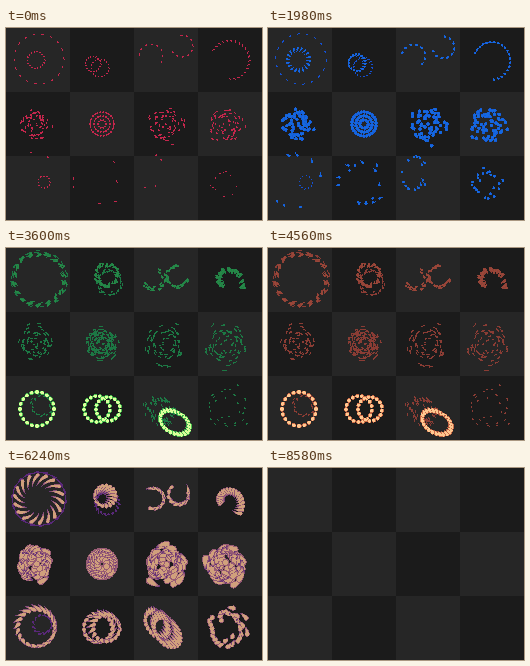
Write an HTML page with a canvas that moves like this. It is 256 px wide and 192 px high and loops after 8.64 s.

```html
<!DOCTYPE html>
<html>
<head>
<meta charset="utf-8">
<style>
html, body { margin: 0; width: 100%; height: 100%; overflow: hidden; background: #1b1b1b; }
canvas { display: block; width: 100vw; height: 100vh; image-rendering: pixelated; }
</style>
</head>
<body>
<canvas id="stage" width="256" height="192"></canvas>
<script>
const ctx = document.getElementById('stage').getContext('2d');
const STEP = 60, STEPS = 16, CELL = 64, SETTLE = 12;

// One palette per burst, from cool to hot.
const PALETTES = [
  ['#c4264c', '#ee4c48', '#ffb878'],
  ['#4414dc', '#a040f4', '#ff88ea'],
  ['#1450d0', '#18a0ff', '#dcffff'],
  ['#1c7844', '#48c050', '#dcff9c'],
  ['#8a3c34', '#cc6c48', '#ffc890'],
  ['#30589c', '#58a8b0', '#d8f0d0'],
  ['#582878', '#985c74', '#d0a07c'],
  ['#34103c', '#e03060', '#ffd850'],
  ['#443880', '#289088', '#d8e050']
].map(p => p.map(c => [1, 3, 5].map(i => parseInt(c.slice(i, i + 2), 16))));

const lerp = (a, b, f) => a + (b - a) * f;
const clamp = v => Math.max(0, Math.min(1, v));
const ease = v => { v = clamp(v); return v * v * (3 - 2 * v); };
const noise = n => { const v = Math.sin(n * 127.1 + 3.7) * 43758.5453; return v - Math.floor(v); };

// from/to: [x, y, radius]; end: step at which the glow dies; hole: 1 is a thin ring, 0 a full disc.
const ring = (count, from, to, more) => ({
  count, from, to, width: 1.5, end: 12.3, glow: 1, spin: 6, fold: 0, hole: 1, pace: 2,
  start: 0, arc: 360, spiral: 0, lobes: 0, squash: 1, tilt: [0, 0], born: 1, ...more
});
const faint = (count, from, to) => ring(count, from, to, { width: .6, glow: 0 });
const late = (count, from, to, more) => ring(count, from, to, { end: 14.2, width: 1.7, born: .1, ...more });
const bloom = (count, from, to, more) => ring(count, from, to, { end: 11.3, width: 3, spin: 8, ...more });
const flower = (x, y, radius, lobes) => bloom(64, [x, y, radius * .9], [x, y, radius], { hole: 0, lobes });

const CELLS = [
  [faint(18, [33, 31, 25], [33, 31, 27]), ring(18, [30, 32, 9], [33, 31, 26], { fold: 6 })],
  [faint(18, [30, 40, 9], [39, 34, 12]), ring(17, [23, 36, 8], [37, 27, 11], { fold: 5, spin: 8 })],
  [
    ring(8, [17, 28, 12], [20, 31, 10], { start: -170, arc: 230, spin: 10 }),
    ring(9, [48, 18, 11], [44, 28, 10], { start: -90, arc: 270, spin: 10 })
  ],
  [ring(20, [32, 32, 20], [28, 34, 19], { start: -150, arc: 250, fold: 9, spin: -6, spiral: .7 })],
  [flower(30, 32, 17, 4)],
  [13, 9, 5].map(r => bloom(r * 2, [32, 32, r - 1], [32, 32, r])),
  [flower(32, 33, 20, 5)],
  [flower(28, 33, 20, 5)],
  [faint(12, [38, 26, 6], [36, 29, 10]), late(20, [26, 24, 28], [31, 33, 17])],
  [late(17, [35, 26, 22], [27, 33, 13]), late(17, [25, 26, 22], [38, 33, 12])],
  [
    late(20, [16, 16, 17], [27, 36, 14], { end: 11.3, pace: 1, squash: .65, tilt: [95, 30], fold: 3 }),
    late(24, [18, 16, 18], [41, 47, 16], { pace: 1, squash: .65, tilt: [95, 30], fold: 3 })
  ],
  [ring(30, [27, 26, 15], [31, 32, 21], { end: 11.7, width: 2.1, hole: .35, spin: 4, born: .4 })]
];

function shade(palette, heat) {
  const h = clamp(heat) * 2, i = h < 1 ? 0 : 1;
  return `rgb(${palette[i].map((v, j) => Math.round(lerp(v, palette[i + 1][j], h - i)))})`;
}

function disc(x, y, r) {
  if (r < .8) return ctx.fillRect(Math.floor(x), Math.floor(y), 1, 1);
  for (let py = Math.floor(y - r); py <= y + r; py++) {
    const dy = py + .5 - y, half = Math.sqrt(Math.max(0, r * r - dy * dy));
    const left = Math.round(x - half), right = Math.round(x + half);
    if (right > left) ctx.fillRect(left, py, right - left, 1);
  }
}

// Where a particle is at a step; inset pulls it towards the centre.
function place(r, i, step, id, inset) {
  const t = 1 - (1 - clamp(step / SETTLE)) ** r.pace;
  const [cx, cy, radius] = r.from.map((v, j) => lerp(v, r.to[j], t));
  const base = r.start + r.arc * i / r.count;
  const angle = (base + r.spin * step) * Math.PI / 180;
  const petal = 1 + .16 * Math.cos(r.lobes * base * Math.PI / 180) * Math.sign(r.lobes);
  const spread = lerp(r.hole, 1, Math.sqrt(noise(id + .9)));
  const coil = lerp(1, i / r.count, r.spiral * t);
  const reach = radius * petal * spread * coil - inset;
  const tilt = lerp(...r.tilt, t) * Math.PI / 180;
  const ex = reach * Math.cos(angle), ey = reach * Math.sin(angle) * r.squash;
  return [cx + ex * Math.cos(tilt) - ey * Math.sin(tilt), cy + ex * Math.sin(tilt) + ey * Math.cos(tilt)];
}

function drawRing(r, step, palette, seed) {
  const life = ease(step / 4.5) * ease((r.end - step) / 1.5);
  const width = .5 + r.width * (.1 + .9 * Math.sqrt(life));
  const heat = life * r.glow;
  const stretch = .2 + .8 * Math.sin(Math.PI * clamp(step / 14)) ** 2;
  const jitter = 5 * ease((step - r.end + 1) / 1.5);
  const copies = jitter > .5 && r.hole === 1 ? 3 : 1;
  const visible = Math.min(r.born + step / 3, (15 - step) / 2);

  for (let i = 0; i < r.count; i++) for (let c = 0; c < copies; c++) {
    const id = seed + i * 7 + c * 131;
    if (noise(id) >= visible) continue;
    const around = noise(id + .3) * Math.PI * 2, off = jitter * Math.sqrt(noise(id + .6));
    const samples = Math.ceil(16 * stretch);
    const trail = Array.from({ length: samples }, (_, s) => {
      const age = 1 - (s + 1) / samples;
      const [x, y] = place(r, i, step - 4 * stretch * age, seed + i * 7, r.fold * stretch * age);
      return { age, x: x + off * Math.cos(around), y: y + off * Math.sin(around) };
    });
    // A cool rim along the whole trail, then its hot core.
    for (const [size, warmth] of [[1, .5], [.72, 1.25]]) for (const p of trail) {
      ctx.fillStyle = shade(palette, heat * warmth * (1 - p.age ** 2));
      disc(p.x, p.y, width * size * (1 - p.age * .75));
    }
  }
}

function draw(tick) {
  const step = tick % STEPS, palette = PALETTES[Math.floor(tick / STEPS)];
  CELLS.forEach((rings, i) => {
    const col = i % 4, row = Math.floor(i / 4);
    ctx.save();
    ctx.translate(col * CELL, row * CELL);
    ctx.fillStyle = (col + row) % 2 ? '#1b1b1b' : '#262626';
    ctx.fillRect(0, 0, CELL, CELL);
    rings.forEach((r, j) => drawRing(r, step, palette, i * 1009 + j * 307));
    ctx.restore();
  });
}

const start = performance.now();
let shown = -1;
function loop() {
  const tick = Math.floor((performance.now() - start) / STEP) % (STEPS * PALETTES.length);
  if (tick !== shown) draw(shown = tick);
  requestAnimationFrame(loop);
}
loop();
</script>
</body>
</html>
```
